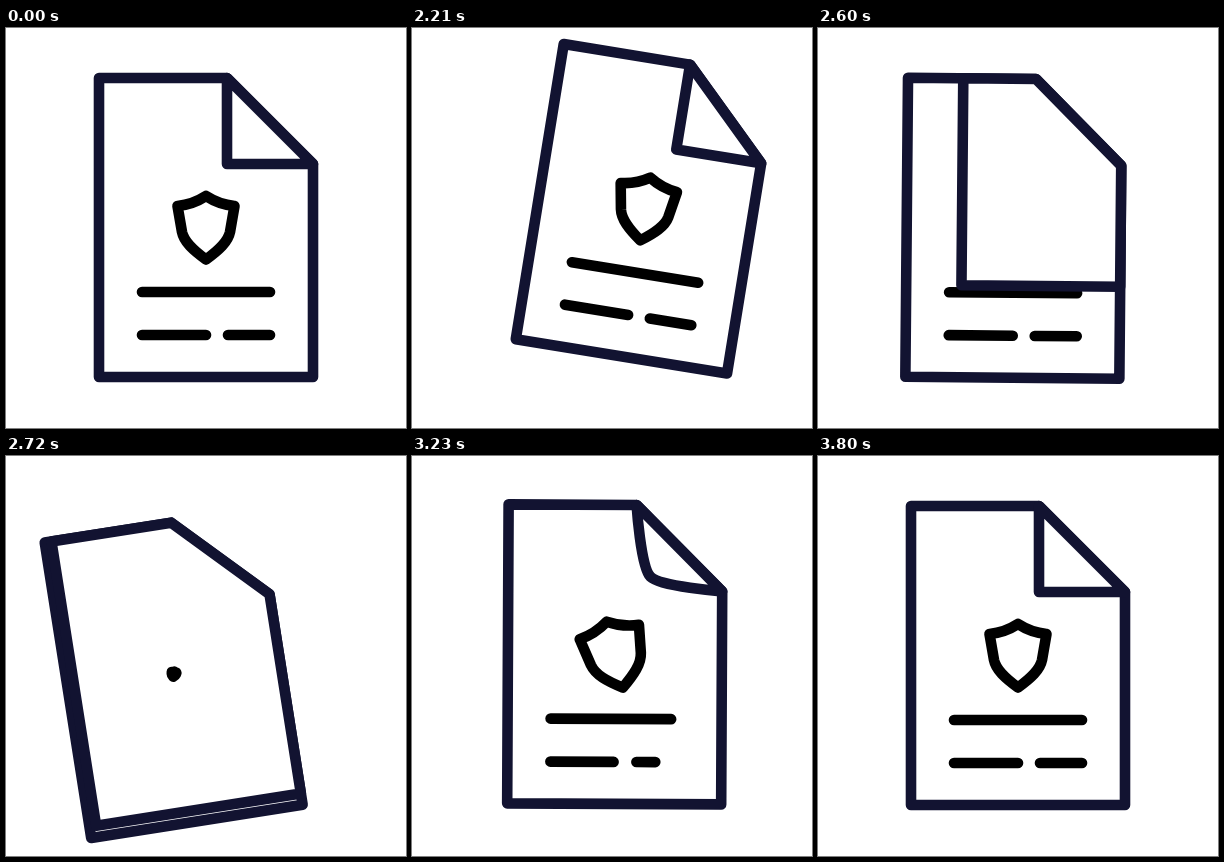
Recreate the animation shown at these times as an HTML page. Size 400 by 400 pixels, loop 3.86 s.

```html
<!DOCTYPE html>
<html lang="en">
<head>
<meta charset="utf-8">
<title>Document with shield</title>
<style>
  html, body { margin: 0; width: 100%; height: 100%; overflow: hidden; background: #fff; }
  svg { display: block; width: 100%; height: 100%; }
  path, line { stroke-width: 10.6; stroke-linecap: round; stroke-linejoin: round; }
  .paper { fill: #fff; stroke: #121331; }
  .ink { fill: none; stroke: #000; }
  #shield { vector-effect: non-scaling-stroke; }
</style>
</head>
<body>
<svg viewBox="0 0 400 400">
  <g id="doc">
    <path class="paper" d="M93 50H221L307 136V349H93Z"/>
    <g id="ink" class="ink">
      <path id="shield" d="M200 168C191.500 173.500 182 177 171.500 178L176 204C178 214 187 222 200 231.500C213 222 222 214 224 204L228.500 178C218 177 208.500 173.500 200 168Z"/>
      <line x1="136" y1="264" x2="264" y2="264"/>
      <line x1="136" y1="307" x2="200" y2="307"/>
      <line x1="222" y1="307" x2="264" y2="307"/>
    </g>
    <path id="fold" class="paper"/>
  </g>
</svg>
<script>
const LOOP = 3860, START = 2030, END = 3800, STEP = 30;
const TURNED = 2720;   // the turned page hides all old ink from here on
const REFOLD = 2820;   // the new corner starts to fold
const LEAD_X = 12, LEAD_Y = 6;   // the slide runs slightly ahead of the tilt, in ms

const clamp = u => Math.min(1, Math.max(0, u));

function bezier(x1, y1, x2, y2) {
  const at = (a, b, s) => 3 * a * s * (1 - s) ** 2 + 3 * b * s * s * (1 - s) + s ** 3;
  return u => {
    let lo = 0, hi = 1;
    for (let i = 0; i < 24; i++) {
      const mid = (lo + hi) / 2;
      if (at(x1, x2, mid) < u) lo = mid; else hi = mid;
    }
    return at(y1, y2, lo);
  };
}

const soft = bezier(.6, 0, .4, 1);
const sharp = bezier(.7, 0, .3, 1);
const quick = bezier(.3, 0, .3, 1);
const settle = bezier(.4, 0, .4, 1);
const pop = bezier(.1, .4, .4, 1);
const slowDown = u => 1 - (1 - u) ** 2.2;

// Each key: [time, value, easing towards this key]
function track(keys, t) {
  if (t <= keys[0][0]) return keys[0][1];
  for (let i = 1; i < keys.length; i++) {
    const [t0, v0] = keys[i - 1], [t1, v1, ease] = keys[i];
    if (t < t1) return v0 + (v1 - v0) * ease((t - t0) / (t1 - t0));
  }
  return keys[keys.length - 1][1];
}

const SWING = [[2000, 0], [2360, 1.07, quick], [2842, -1, sharp], [2870, -1, soft], [3480, .45, soft], [3800, 0, settle]];
const TURN = [[2360, 0], [2815, 1, soft]];
const CORNER = [[2830, 0], [3530, 1, soft]];
const SHIELD_SIZE = [[2710, 0], [3200, 1.07, pop], [3620, 1, soft]];
const SHIELD_TILT = [[2720, 20], [3210, -14, soft], [3640, 0, soft]];
const LINE_TIMES = [[2780, 620], [2780, 520], [3130, 420]];

const $ = id => document.getElementById(id);
const doc = $('doc'), ink = $('ink'), fold = $('fold'), shield = $('shield');
const lines = [...ink.querySelectorAll('line')].map(el => ({
  el, x1: +el.getAttribute('x1'), x2: +el.getAttribute('x2')
}));

function turningFold(p) {
  const x = 221 - 128 * p, y = 136 + 213 * p;
  return `M221 50H${x}V${y}H307V136Z`;
}

function curledFold(q) {
  const x = 264 - 43 * q, y = 93 + 43 * q, h = 30 * (1 - q);
  return `M221 50C221 50 ${x - h} ${y - h} ${x} ${y}C${x + h} ${y + h} 307 136 307 136Z`;
}

function draw(t) {
  const x = 36 * track(SWING, t + LEAD_X);
  const y = -20.5 * track(SWING, t + LEAD_Y);
  const turn = 10.3 * track(SWING, t);
  doc.setAttribute('transform', `translate(${x} ${y}) rotate(${turn} 200 199.500)`);

  fold.setAttribute('d', t < REFOLD ? turningFold(track(TURN, t)) : curledFold(track(CORNER, t)));

  const fresh = t >= TURNED && t < END;
  if (fresh) doc.append(fold, ink); else doc.append(ink, fold);

  const size = fresh ? track(SHIELD_SIZE, t) : 1;
  const tilt = fresh ? track(SHIELD_TILT, t) : 0;
  shield.setAttribute('transform',
    `translate(200 200) rotate(${tilt}) scale(${size}) translate(-200 -200)`);

  lines.forEach(({ el, x1, x2 }, i) => {
    const [from, span] = LINE_TIMES[i];
    const k = fresh ? slowDown(clamp((t - from) / span)) : 1;
    el.setAttribute('x2', x1 + (x2 - x1) * k);
    el.style.visibility = k > 0 ? 'visible' : 'hidden';
  });
}

const begin = performance.now();

function tick() {
  const t = (performance.now() - begin) % LOOP;
  const held = t < START ? 0 : Math.min(END, START + Math.floor((t - START) / STEP) * STEP);
  draw(held);
  requestAnimationFrame(tick);
}
tick();
</script>
</body>
</html>
```
